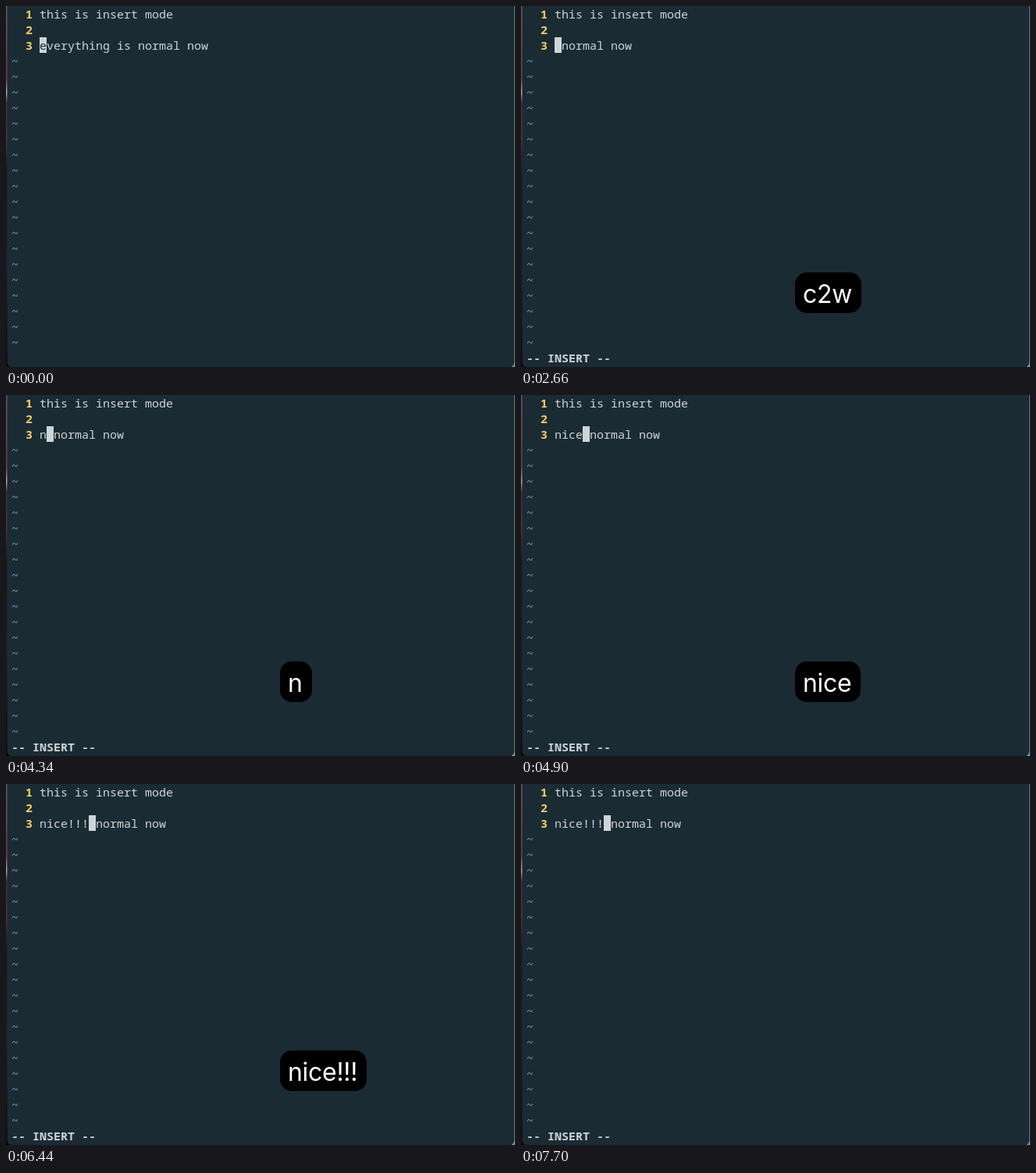
Recreate the animation shown at these times as an HTML page with a canvas. Size 652 by 462 pixels, loop 7770 ms.

```html
<!DOCTYPE html>
<html lang="en">
<head>
<meta charset="utf-8">
<title>Changing two words</title>
<style>
html, body { margin: 0; width: 652px; height: 462px; overflow: hidden; background: #000; }
canvas { display: block; }
</style>
</head>
<body>
<canvas id="stage" width="652" height="462"></canvas>
<script>
const ctx = document.getElementById('stage').getContext('2d');
const LOOP = 7770, STEP = 70;
const CELL = 9, ROW = 20, LEFT = 7;
const MONO = '"Noto Sans Mono", "DejaVu Sans Mono", monospace';
const BG = '#1b2b33', FG = '#ced5da', GOLD = '#f7ce69', BLUE = '#6ba3cd';

// Key presses: [time, key]
const command = [[140, 'c'], [420, '2'], [700, 'w']];
const typing = [[4270, 'n'], [4480, 'i'], [4620, 'c'], [4760, 'e'],
                [5040, '!'], [5250, '!'], [5390, '!']];
const HOLD = 1990, FADE = 210;

const pressed = (keys, t) => keys.filter(k => k[0] <= t).map(k => k[1]).join('');

function put(text, col, row, color, weight = 500) {
  ctx.font = `${weight} 15px ${MONO}`;
  ctx.fillStyle = color;
  [...text].forEach((ch, i) => ctx.fillText(ch, LEFT + (col + i) * CELL, row * ROW + 16));
}

function box(x, y, w, h, r, color) {
  ctx.fillStyle = color;
  ctx.beginPath();
  ctx.roundRect(x, y, w, h, r);
  ctx.fill();
}

function drawWindow() {
  const edge = ctx.createLinearGradient(0, 0, 0, 462);
  [[0, '#53616f'], [0.06, '#715054'], [0.2, '#7d3940'], [0.24, '#b5a5a5'],
   [0.27, '#3b3034'], [0.36, '#642f3a'], [0.46, '#141c27'], [0.72, '#152330'], [1, '#05080b']]
    .forEach(([at, color]) => edge.addColorStop(at, color));
  ctx.fillStyle = edge;
  ctx.fillRect(0, 0, 4, 462);
  ctx.fillStyle = '#071016';
  ctx.fillRect(4, 450, 644, 12);
  ctx.fillStyle = '#82938f';
  ctx.fillRect(648, 0, 4, 462);
  box(1.5, -8, 649.7, 470, 6, BG);
}

function drawEditor(t) {
  const inserting = t >= command[2][0];
  const word = pressed(typing, t);
  const line = inserting ? word + ' normal now' : 'everything is normal now';
  const cursor = 4 + word.length;

  for (let n = 0; n < 3; n++) put(String(n + 1), 2, n, GOLD, 600);
  for (let row = 3; row < 22; row++) put('~', 0, row, BLUE);
  put('this is insert mode', 4, 0, FG);
  put(line, 4, 2, FG);
  ctx.fillStyle = FG;
  ctx.fillRect(LEFT + cursor * CELL, 40, CELL, ROW);
  put(line[word.length], cursor, 2, BG);
  if (inserting) put('-- INSERT --', 0, 22, FG, 700);
}

function drawKeys(keys, t) {
  const text = pressed(keys, t);
  if (!text) return;
  const end = keys[keys.length - 1][0] + HOLD;
  const alpha = 1 - Math.max(0, t - end) / FADE;
  if (alpha <= 0) return;
  ctx.globalAlpha = alpha;
  ctx.font = '400 32px Inter, "Liberation Sans", sans-serif';
  ctx.letterSpacing = '-0.3px';
  box(351, 341, Math.round(ctx.measureText(text).width + 22), 52, 15, '#000');
  ctx.fillStyle = '#fff';
  ctx.fillText(text, 361, 380);
  ctx.letterSpacing = '0px';
  ctx.globalAlpha = 1;
}

function draw(now) {
  const t = Math.floor((now % LOOP) / STEP) * STEP;
  ctx.clearRect(0, 0, 652, 462);
  drawWindow();
  drawEditor(t);
  drawKeys(command, t);
  drawKeys(typing, t);
}

const start = performance.now();
function tick() {
  draw(performance.now() - start);
  requestAnimationFrame(tick);
}
tick();
</script>
</body>
</html>
```
